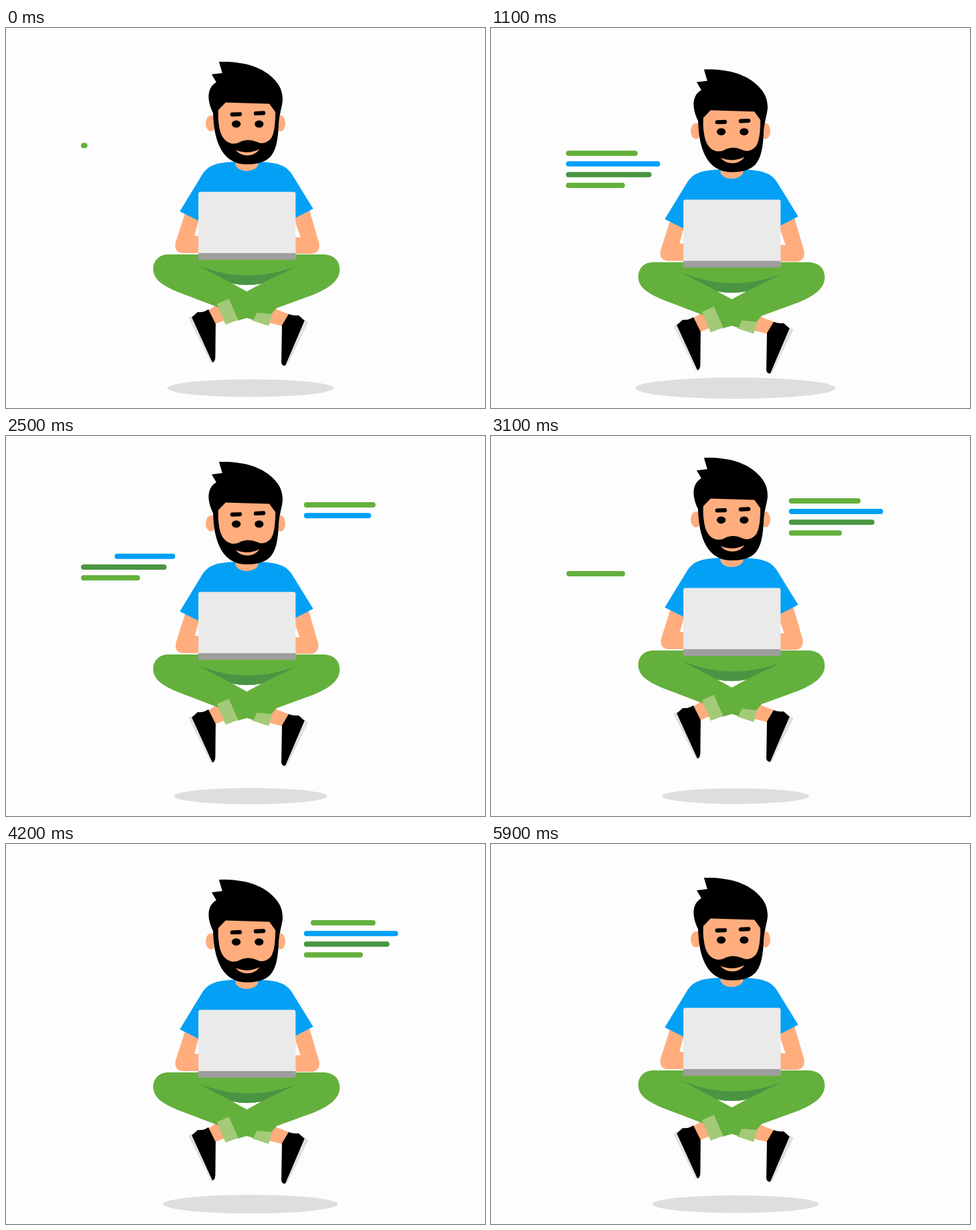
Recreate the animation shown at these times as an HTML page without scripts. Size 722 px wide and 574 px high, loop 6000 ms.

```html
<!DOCTYPE html>
<html lang="en">
<head>
<meta charset="utf-8">
<title>Floating coder</title>
<style>
  @property --t { syntax: "<number>"; inherits: true; initial-value: 0; }

  html, body { margin: 0; width: 100%; height: 100%; overflow: hidden; background: #fdfdfd; }

  /* One clock in ms, ticking ten times a second, drives every part. */
  svg {
    display: block; width: 722px; height: 574px;
    animation: clock 6s steps(60) infinite;
    --u: calc((var(--t) + 50) / 1000);
    --low: max(0, 1 - max(var(--u) - 1, 1 - var(--u)), 1 - max(var(--u) - 5, 5 - var(--u)));
    --high: max(0, 1 - max(var(--u) - 3, 3 - var(--u)));
  }
  @keyframes clock { from { --t: 0; } to { --t: 6000; } }

  .float { transform: translateY(calc((14.5 * var(--low) - 20.5 * var(--high) - .7) * 1px)); }
  .shadow {
    fill: #dedede;
    transform-origin: 368.5px 544px;
    transform: scale(calc(1 + .254 * var(--low) - .125 * var(--high)));
  }
  .eye {
    transform-box: fill-box; transform-origin: center;
    transform: scaleY(clamp(.1, max(var(--t) - 4950, 4950 - var(--t)) / 100, 1));
  }
  .arm { transform: translateX(calc(var(--dx) * var(--high) * 1px)); }

  /* Each line is written left to right, later wiped left to right. */
  line {
    --drawn: clamp(0, (var(--t) - var(--in) - var(--i) * 274) / 274, 1);
    --wiped: clamp(0, (var(--t) - var(--out) - var(--i) * var(--wipe)) / var(--wipe), 1);
    --len: calc(var(--drawn) - var(--wiped));
    stroke-width: 8; stroke-linecap: round;
    stroke-dasharray: calc(var(--len) * 1px) 9px;
    stroke-dashoffset: calc(var(--wiped) * -1px);
    opacity: clamp(0, var(--len) * 1000, 1);
  }
  .left { --in: -5; --out: 1993; --wipe: 368; }
  .right { --in: 2035; --out: 4163; --wipe: 359; }

  .skin { fill: #ffad7d; }
  .shirt { fill: #03a0f5; }
  .pants { fill: #64b03c; }
  .fold { fill: #4a9543; }
  .cuff { fill: #a3ca78; }
  .sole { fill: #e0e0e0; }
  .brow { stroke: #000; stroke-width: 6.2; stroke-linecap: round; }
</style>
</head>
<body>
<svg viewBox="0 0 722 574">
  <defs>
    <g id="lines">
      <line style="--i:0" pathLength="1" x1="117" x2="217" y1="177.5" y2="177.5" stroke="#64b03c"/>
      <line style="--i:1" pathLength="1" x1="117" x2="251" y1="193.7" y2="193.7" stroke="#03a0f8"/>
      <line style="--i:2" pathLength="1" x1="117" x2="238" y1="209.9" y2="209.9" stroke="#4a9543"/>
      <line style="--i:3" pathLength="1" x1="117" x2="198" y1="226.1" y2="226.1" stroke="#64b03c"/>
    </g>
  </defs>

  <ellipse class="shadow" cx="368.5" cy="544" rx="124" ry="13.2"/>

  <g class="float">
    <use class="left" href="#lines"/>
    <use class="right" href="#lines" x="336" y="-61.5"/>

    <!-- feet -->
    <path class="skin" d="M304 427L320 417L331 441L313 448ZM400 422L426 432L416 450L395 445Z"/>
    <path class="sole" d="M275 438L282 434L314 504L309 506ZM449 440L456 444L424 509L418 511Z"/>
    <path d="M280 437L289 429Q298 430 305 425L316 447L315.500 497Q315 505 311 505ZM426 432Q433 435 441 434L450 442L421 510Q416 511 415 505L416 449Z"/>

    <!-- legs -->
    <path class="cuff" d="M378 429L402 429L396 450L371 442Z"/>
    <path class="pants" d="M245 342H480C495 343 503 352 503 365C503 384 482 395 463 403L408 423L400 432L378 430L373 441L363 438L349 442L320 422L257 398C240 390 222 382 222 364C222 351 231 342 245 342Z"/>
    <path class="cuff" d="M318 417L336 409L350 441L331 448Z"/>
    <path fill="#fff" d="M341 386Q363 390 385 386L363 398Z"/>
    <path class="fold" d="M286 357Q362 389 438 360L385 386Q363 390.500 341 386Z"/>

    <!-- arms and torso -->
    <path class="skin arm" style="--dx:1" d="M270 279L256 323C253 334 258 340 267 340H292V314H284L291 288Z"/>
    <path class="skin arm" style="--dx:-2.500" d="M457 274L471 322C475 334 469 341 460 341H434V316H444L436 293V284Z"/>
    <path class="shirt" d="M346 202C318 203 305 207 296 221L262 277L290 291L436 287L463 273L431 221C422 207 408 203 380 202Z"/>
    <path class="skin" d="M346 198H380V208Q374 216 362 216Q352 216 346 208Z"/>

    <!-- laptop -->
    <rect x="290" y="247.500" width="146.500" height="100" rx="3" fill="#eaeaea"/>
    <path fill="#9e9e9e" d="M290 340H436.500V350H290Z"/>

    <!-- head -->
    <ellipse class="skin" cx="309" cy="144" rx="8" ry="12"/>
    <ellipse class="skin" cx="414" cy="144" rx="7" ry="12"/>
    <path d="M321 51C357 50 380 58 396 70C411 82 417 93 417 109C416 120 412 130 411 145C410 170 407 184 399 194C391 203 377 206 362 206C345 206 332 197 325 185C315 168 313 148 312 128C304 112 301 91 317 82L310 70L326 68Z"/>
    <path class="skin" d="M331 112.500L397 114.500L406 127C406 142 405 157 400 166C394 174 385 176 378 172Q364 166 351 173C340 178 328 172 323 157Q319 142 320 124Z"/>
    <path class="skin" d="M346 184Q364 192 382 183Q376 192.500 363 192.500Q352 192 346 184Z"/>
    <path class="brow" d="M341 130.600L352.500 130.200M376.500 129L388 128.400"/>
    <ellipse class="eye" cx="347" cy="145" rx="6.700" ry="5.500"/>
    <ellipse class="eye" cx="381.500" cy="145" rx="6.700" ry="5.500"/>
  </g>
</svg>
</body>
</html>
```
